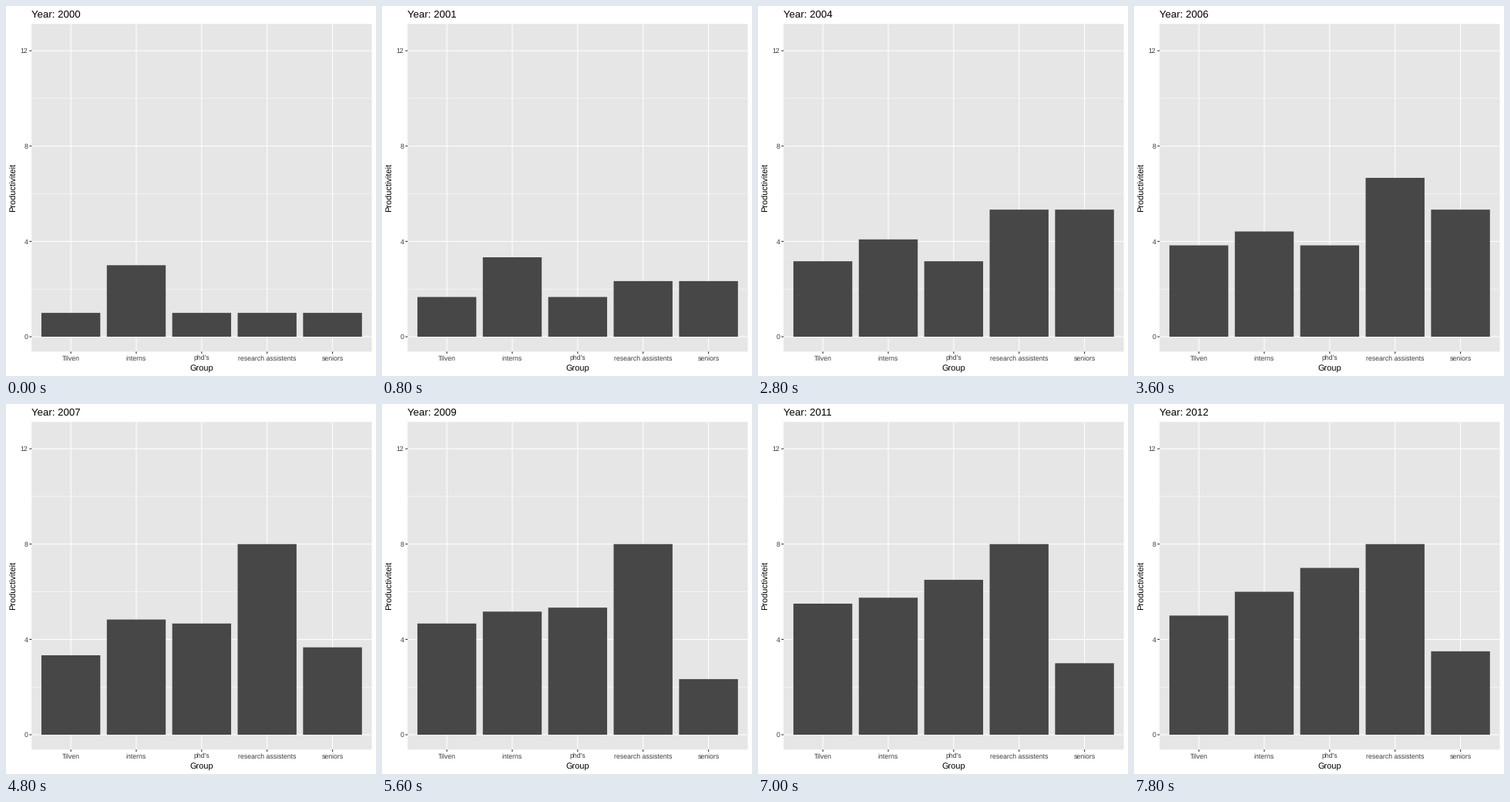
These frames come from a looping animation (480 px wide and 480 px high, 8000 ms). A matplotlib script:

```python
import matplotlib.pyplot as plt
import numpy as np
from matplotlib.animation import FuncAnimation
from matplotlib.patches import Rectangle

SIZE, DPI = 480, 80
PX = 72 / DPI                      # points per pixel
FRAMES, INTERVAL = 40, 200
FRAMES_PER_YEAR = 100 / 31

plt.rcParams["font.family"] = "Liberation Sans"
plt.rcParams["text.hinting"] = "none"

# Panel edges in pixels, y pointing down
LEFT, RIGHT, TOP, BOTTOM = 33.2, 474.5, 23.3, 448.35
STEP = (RIGHT - LEFT) / 5.2
UNIT = (BOTTOM - TOP) / 1.1 / 12.5
ZERO = BOTTOM - (BOTTOM - TOP) * 0.05 / 1.1

PANEL, BAR, LABEL, TICK = "#e6e6e6", "#474747", "#3b3b3b", "#242424"

# Yearly values from 2000 to 2012
years = np.arange(13)
groups = {
    "Tilven": [1, 1.5, 2, 2.5, 3, 3.5, 4, 3, 4, 5, 6, 5.5, 5],
    "interns": 3 + years / 4,
    "phd's": 1 + years / 2,
    "research assistents": np.minimum(1 + years, 8),
    "seniors": [1, 2, 3, 4, 5, 6, 5, 4, 3, 2, 2.5, 3, 3.5],
}
# Each year lands on a whole frame
key_frames = np.round(years * FRAMES_PER_YEAR)

fig = plt.figure(figsize=(SIZE / DPI, SIZE / DPI), dpi=DPI, facecolor="white")
ax = fig.add_axes([0, 0, 1, 1])
ax.set_xlim(0, SIZE)
ax.set_ylim(SIZE, 0)
ax.axis("off")


def x_pos(index):
    return LEFT + STEP * (0.6 + index)


def y_pos(value):
    return ZERO - UNIT * value


def box(x, y, w, h, color, z):
    return ax.add_patch(Rectangle((x, y), w, h, fc=color, lw=0,
                                  snap=False, zorder=z))


def line(xs, ys, color, width, z):
    ax.plot(xs, ys, color=color, lw=width * PX, solid_capstyle="butt",
            snap=False, zorder=z)


def label(x, y, text, size, color="black", ha="center", **kw):
    return ax.text(x, y, text, fontsize=size * PX, color=color, ha=ha,
                   va="baseline", zorder=5, **kw)


box(LEFT, TOP, RIGHT - LEFT, BOTTOM - TOP, PANEL, 0)

for value in (2, 6, 10):
    line([LEFT, RIGHT], [y_pos(value)] * 2, "white", 0.53, 1)

for value in (0, 4, 8, 12):
    y = y_pos(value)
    line([LEFT, RIGHT], [y, y], "white", 1.07, 2)
    line([LEFT - 2.75, LEFT], [y, y], TICK, 1.07, 4)
    label(28.3, y + 3.15, str(value), 8.8, LABEL, "right")

bars = []
for i, name in enumerate(groups):
    x = x_pos(i)
    line([x, x], [TOP, BOTTOM], "white", 1.07, 2)
    line([x, x], [BOTTOM, BOTTOM + 2.75], TICK, 1.07, 4)
    label(x, 459.6, name, 8.8, LABEL)
    bars.append(box(x - 0.45 * STEP, ZERO, 0.9 * STEP, 0, BAR, 3))

title = label(LEFT, 15, "", 13.2, ha="left")
label((LEFT + RIGHT) / 2, 472.4, "Group", 11)
label(13.4, (TOP + BOTTOM) / 2, "Productiviteit", 11, rotation=90,
      rotation_mode="anchor")


def update(frame):
    title.set_text(f"Year: {2000 + round(frame / FRAMES_PER_YEAR)}")
    for bar, values in zip(bars, groups.values()):
        bar.set_height(-UNIT * np.interp(frame, key_frames, values))
    return [title, *bars]


anim = FuncAnimation(fig, update, frames=FRAMES, interval=INTERVAL,
                     init_func=lambda: update(0), repeat=True, repeat_delay=0)
plt.show()
```
